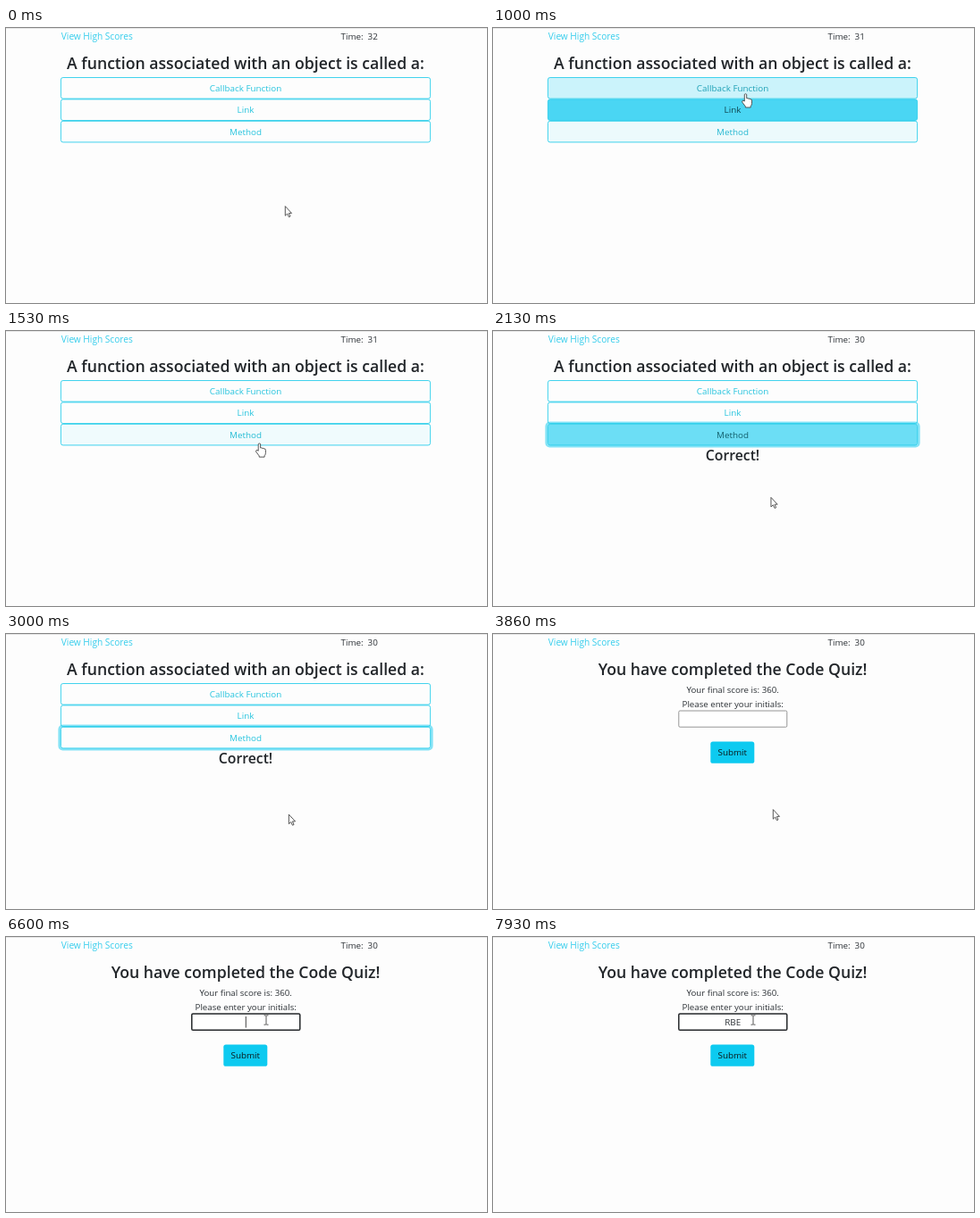
Recreate the animation shown at these times as an HTML page. Size 538x308 px, loop 8 s.

```html
<!DOCTYPE html>
<html lang="en">
<head>
<meta charset="utf-8">
<title>Code quiz</title>
<style>
  html, body { margin: 0; width: 100%; height: 100%; overflow: hidden; background: #fdfdfd; }
  svg { display: block; width: 100%; height: 100%; }
  text { font: 9.85px "Open Sans", "Noto Sans", sans-serif; fill: #2b3035; }
  .mid { text-anchor: middle; }
  .head { font-size: 17.65px; font-weight: 600; fill: #212529; }
  .verdict { font-size: 15.8px; font-weight: 600; fill: #212529; }
  .small { font-size: 9.7px; }
  .link { font-size: 10.15px; fill: #35cdec; }
</style>
</head>
<body>
<svg viewBox="0 0 538 308" preserveAspectRatio="none">
  <rect width="538" height="308" fill="#fdfdfd"/>
  <rect width="538" height="1" fill="#e6e6e6"/>
  <text class="link" x="61.8" y="13">View High Scores</text>
  <text x="374.5" y="13">Time:</text>
  <text id="time" x="404.6" y="13"></text>
  <text id="title" class="head mid" x="268" y="45.5"></text>

  <g id="quiz">
    <rect id="ring" x="59.7" y="102.7" width="416.6" height="26.6" rx="3.8" fill="none" stroke="#0dcaf0" stroke-opacity=".5" stroke-width="2.6"/>
    <g id="options"></g>
    <text id="verdict" class="verdict mid" x="268" y="145">Correct!</text>
  </g>

  <g id="done">
    <text class="small mid" x="268.2" y="66.2">Your final score is: 360.</text>
    <text class="small mid" x="268.2" y="81.7">Please enter your initials:</text>
    <rect id="field" x="207.8" y="86" width="121" height="18.2" rx="1.3" fill="#fff"/>
    <text id="initials" class="mid" x="268.2" y="99.2"></text>
    <rect id="caret" y="89" width="1" height="12.6" fill="#444"/>
    <rect x="243.3" y="120.6" width="49" height="24.2" rx="2.6" fill="#0dcaf0"/>
    <text class="mid" x="267.8" y="136.4" style="fill:#0b1a1d">Submit</text>
  </g>

  <g id="pointer" stroke-linejoin="round" stroke="#444" stroke-width=".9" fill="#fff">
    <path id="arrow" d="M.3 .6V11.2L2.7 9 4.4 12.7 6 12 4.4 8.4H7.5Z"/>
    <path id="hand" d="M-1.2 8.3V1Q-1.2 0 0 0T1.2 1V5Q2.8 4.5 3.4 5.5 4.8 5 5.4 6 7 5.8 7 7.4V10.5Q7 12.5 5.7 13.8V15.2H-.2V14L-3.8 9.2Q-4 7.5-2.6 7.4Z"/>
    <path id="beam" d="M-2.5-5.2H-.8L0-4.6 .8-5.2H2.5M0-4.6V4.6M-2.5 5.2H-.8L0 4.6 .8 5.2H2.5" fill="none"/>
  </g>
</svg>
<script>
const LOOP = 8000, CLICK = 1800, FINISH = 3800, FOCUS = 5270;
const FADE = 150, BLINK = 530;
const FIRST_KEY = 6740, KEY_GAP = 330, INITIALS = "RBE";
const LABELS = ["Callback Function", "Link", "Method"];
const TOP = 55, PITCH = 24.4;

// pointer moves; it rests in between
const START = { x: 312, y: 199 };
const MOVES = [
  { from: 60, to: 640, x: 300, y: 165 },
  { from: 659, to: 1072, x: 281, y: 66 },
  { from: 1090, to: 1420, x: 283, y: 133 },
  { from: 1480, to: 1595, x: 284, y: 116 },
  { from: 2075, to: 2155, x: 318, y: 205 },
  { from: 2660, to: 3460, x: 313, y: 196 },
  { from: 4400, to: 5200, x: 291, y: 93 }
];

const $ = id => document.getElementById(id);
const show = (el, on) => el.setAttribute("display", on ? "inline" : "none");
const mix = (a, b, k) => a + (b - a) * k;
const clamp = k => Math.min(1, Math.max(0, k));
const smooth = k => k * k * (3 - 2 * k);

function set(el, attrs) {
  for (const key in attrs) el.setAttribute(key, attrs[key]);
  return el;
}

function make(tag, attrs, parent) {
  const el = document.createElementNS("http://www.w3.org/2000/svg", tag);
  return parent.appendChild(set(el, attrs));
}

function pointerAt(t) {
  return MOVES.reduce((p, m) => {
    const k = smooth(clamp((t - m.from) / (m.to - m.from)));
    return { x: mix(p.x, m.x, k), y: mix(p.y, m.y, k) };
  }, START);
}

// CSS "ease": cubic-bezier(.25, .1, .25, 1), solved by bisection
function ease(x) {
  x = clamp(x);
  let lo = 0, hi = 1, s = 0;
  for (let i = 0; i < 20; i++) {
    s = (lo + hi) / 2;
    if (.75 * s * (1 - s) + s ** 3 < x) lo = s; else hi = s;
  }
  return .3 * s * (1 - s) ** 2 + 3 * s * s * (1 - s) + s ** 3;
}

function optionAt(t) {
  const i = Math.floor((pointerAt(t).y - TOP) / PITCH);
  return t < FINISH && i in LABELS ? i : -1;
}

// hover spans [enter, leave] for each option
const spans = LABELS.map(() => []);
for (let t = 0, last = -1; t <= FINISH; t++) {
  const now = optionAt(t);
  if (now === last) continue;
  if (last >= 0) spans[last].at(-1)[1] = t;
  if (now >= 0) spans[now].push([t, Infinity]);
  last = now;
}

const hover = (i, t) => Math.max(0, ...spans[i].map(
  ([enter, leave]) => ease((t - enter) / FADE) * (1 - ease((t - leave) / FADE))));

const options = LABELS.map((label, i) => {
  const y = TOP + i * PITCH;
  const box = make("rect", { x: 61.4, y: y + .5, width: 413.2, height: 23.6, rx: 2.4,
    fill: "#0dcaf0", stroke: "#2dcfeb", "stroke-width": .9 }, $("options"));
  const text = make("text", { class: "mid", x: 268, y: y + 15.9 }, $("options"));
  text.textContent = label;
  return { box, text };
});

function drawQuiz(t) {
  $("title").textContent = "A function associated with an object is called a:";
  options.forEach(({ box, text }, i) => {
    const k = hover(i, t);
    set(box, { "fill-opacity": k });
    text.style.fill = `rgb(${mix(38, 5, k)},${mix(196, 25, k)},${mix(222, 30, k)})`;
  });
  set($("ring"), { opacity: ease((t - CLICK) / FADE) });
  show($("verdict"), t >= CLICK);
}

function drawDone(t) {
  $("title").textContent = "You have completed the Code Quiz!";
  const focused = t >= FOCUS;
  set($("field"), { stroke: focused ? "#25282b" : "#8c8c8c", "stroke-width": focused ? 1.5 : .9 });

  const typed = Math.min(INITIALS.length, Math.max(0, Math.floor((t - FIRST_KEY) / KEY_GAP) + 1));
  const text = $("initials");
  text.textContent = INITIALS.slice(0, typed);

  const since = t - (typed ? FIRST_KEY + (typed - 1) * KEY_GAP : FOCUS);
  const width = typed ? text.getComputedTextLength() : 0;
  set($("caret"), { x: 267.8 + width / 2 });
  show($("caret"), focused && since % (2 * BLINK) < BLINK);
}

function drawPointer(t) {
  const { x, y } = pointerAt(t);
  const overField = t >= FINISH && y > 85.5 && y < 104.5;
  const overOption = optionAt(t) >= 0;
  set($("pointer"), { transform: `translate(${x} ${y})` });
  show($("beam"), overField);
  show($("hand"), overOption);
  show($("arrow"), !overField && !overOption);
}

function draw(t) {
  const finished = t >= FINISH;
  $("time").textContent = t < 900 ? 32 : t < 1900 ? 31 : 30;
  show($("quiz"), !finished);
  show($("done"), finished);
  if (finished) drawDone(t); else drawQuiz(t);
  drawPointer(t);
}

const start = performance.now();
function frame() {
  draw((performance.now() - start) % LOOP);
  requestAnimationFrame(frame);
}
frame();
</script>
</body>
</html>
```
